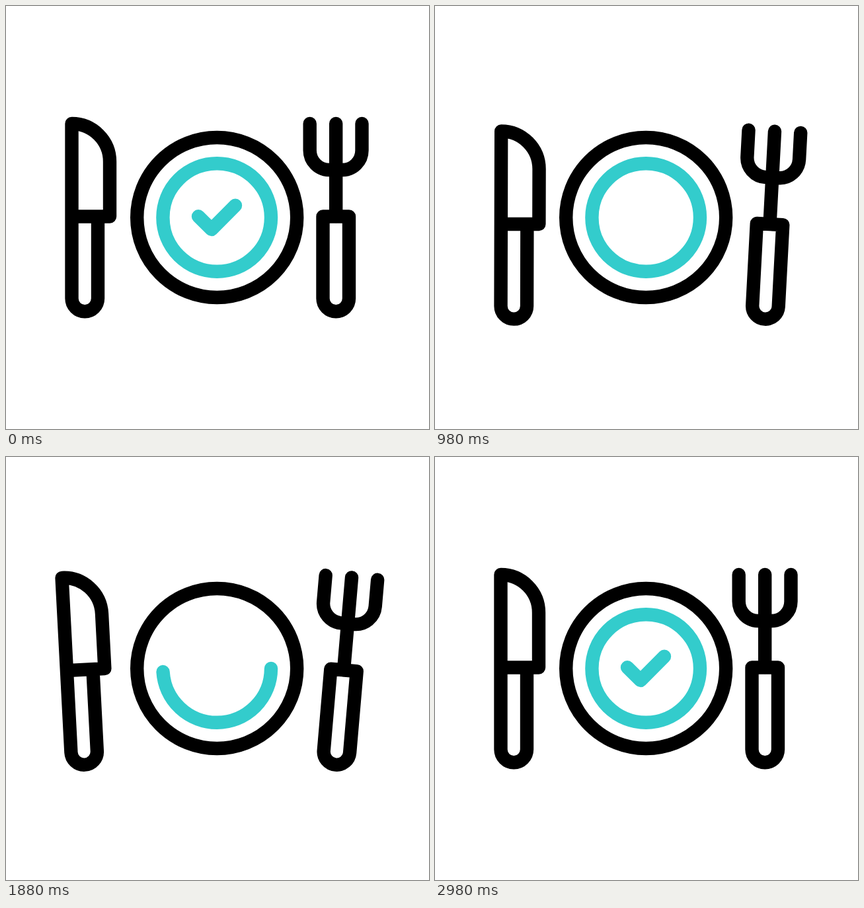
These frames come from a looping animation (640x640 px, 3080 ms). An HTML page:

```html
<!DOCTYPE html>
<html lang="en">
<head>
<meta charset="utf-8">
<title>Dinner plate</title>
<style>
  html, body { margin: 0; width: 100%; height: 100%; overflow: hidden; background: #fff; }
  svg { display: block; width: 100%; height: 100%; }
  g { fill: none; stroke: #000; stroke-width: 20.4; stroke-linecap: round; stroke-linejoin: round; }
  .accent { stroke: #33cccc; }
</style>
</head>
<body>
<svg viewBox="0 0 640 640">
  <g><circle cx="319.2" cy="320" r="121"/></g>
  <g class="accent" id="accent">
    <path id="ring" pathLength="1" d="M401 320A81.8 81.8 0 0 0 237.4 320A81.8 81.8 0 0 0 401 320"/>
    <path id="check" pathLength="1" d="M291 318.3L311 338L347 301.7"/>
  </g>
  <g id="knife">
    <path d="M99.5 318.5H157V235.5A57.5 57.5 0 0 0 99.5 178V442.5a19.75 19.75 0 0 0 39.5 0V318.5"/>
  </g>
  <g id="fork">
    <path d="M479.5 318.5H519V442.5a19.75 19.75 0 0 1 -39.5 0Z"/>
    <path d="M499.2 178V318M459.7 178V218.5a29.5 29.5 0 0 0 29.5 29.5H509a29.5 29.5 0 0 0 29.5 -29.5V178"/>
  </g>
</svg>
<script>
const LOOP = 3080, STEP = 20;
const BEATS = [442, 730, 1018, 1394, 1684, 1982]; // turning points of the cutlery
const TILT_LAG = 66;
const REFILL = 2090; // the plate is empty, the marks start to draw in again
const $ = id => document.getElementById(id);

// Eased progress from 0 to 1 between two times.
function ease(t, from, to) {
  const p = Math.min(1, Math.max(0, (t - from) / (to - from)));
  return (1 - Math.cos(Math.PI * p)) / 2;
}

// Rest, then two swings between the extremes, then rest.
function swing(t, high, low) {
  const pose = i => i % 5 === 0 ? 0 : i % 2 ? high : low;
  return BEATS.slice(1).reduce((v, end, i) =>
    v + (pose(i + 1) - pose(i)) * ease(t, BEATS[i], end), 0);
}

function move(id, x, y, t, high, low) {
  const lift = swing(t, -24.5, 13);
  const tilt = swing(t - TILT_LAG, high, low);
  $(id).setAttribute("transform", `translate(0 ${lift}) rotate(${tilt} ${x} ${y})`);
}

function trim(el, start, end) {
  const len = end - start;
  el.style.visibility = len > 0.002 ? "visible" : "hidden";
  el.setAttribute("stroke-dasharray", `${Math.max(len, 0)} 3`);
  el.setAttribute("stroke-dashoffset", -start);
}

const rays = [-25, 0, 25, 155, 180, 205].map(deg => {
  const ray = document.createElementNS("http://www.w3.org/2000/svg", "path");
  const a = deg * Math.PI / 180;
  const point = r => `${317 + r * Math.sin(a)} ${314.5 - r * Math.cos(a)}`;
  ray.setAttribute("d", `M${point(150)}L${point(212.3)}`);
  ray.setAttribute("pathLength", 1);
  return $("accent").appendChild(ray);
});

function draw(t) {
  move("knife", 119.5, 464, t, 12.8, -5);
  move("fork", 499.3, 456, t, -9.65, 8.2);

  if (t < REFILL) {
    trim($("check"), ease(t, 420, 640), 1);
    trim($("ring"), 0.51 * ease(t, 1120, 1440) + 0.49 * ease(t, 1890, 2050), 1);
  } else {
    trim($("check"), 0, ease(t, REFILL, 2390));
    trim($("ring"), 0, ease(t, 2300, 2570));
  }
  for (const ray of rays) trim(ray, ease(t, 2600, 2980), ease(t, 2460, 2660));
}

const begin = performance.now();
function tick() {
  const t = (performance.now() - begin) % LOOP;
  draw(Math.floor(t / STEP) * STEP);
  requestAnimationFrame(tick);
}
tick();
</script>
</body>
</html>
```
